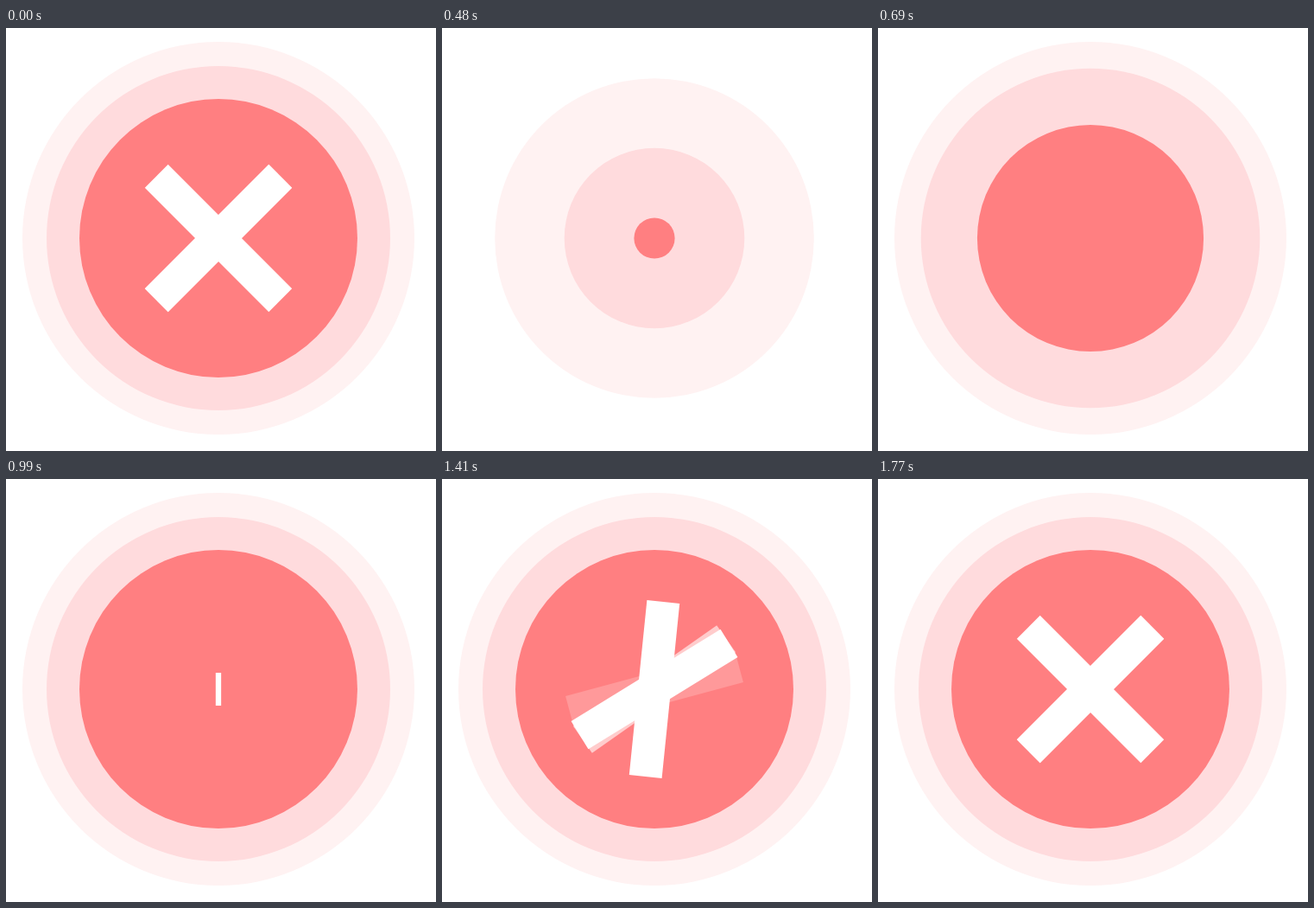
An HTML page for the animation above (2.25 s loop, 498x489 px).

```html
<!DOCTYPE html>
<html lang="en">
<head>
<meta charset="utf-8">
<title>Error badge</title>
<style>
  html, body { margin: 0; width: 100%; height: 100%; overflow: hidden; background: #fff; }
  svg { display: block; width: 498px; height: 489px; }
</style>
</head>
<body>
<svg viewBox="0 0 498 489">
  <g id="stage" transform="translate(246 243)"></g>
</svg>
<script>
const LOOP = 2250, STEP = 30, HOLD = 120;
const GROW = 537, SPIN = 452;
const BAR = { start: 958, time: 227, length: 203, width: 38 };

const discs = [
  { r: 227, fill: '#fff2f2', start: 115 },
  { r: 199, fill: '#ffdbdd', start: 205 },
  { r: 161, fill: '#ff7f81', start: 325 }
];

// Back to front: two faint trailing bars, then the two strokes of the cross.
const bars = [
  { turn: -225, start: 1318, alpha: 0.2 },
  { turn: -225, start: 1276, alpha: 0.6 },
  { turn: -135, start: 1250, alpha: 1 },
  { turn: -225, start: 1213, alpha: 1 }
];

const stage = document.getElementById('stage');

function add(tag, attrs) {
  const el = document.createElementNS('http://www.w3.org/2000/svg', tag);
  set(el, attrs);
  return stage.appendChild(el);
}

function set(el, attrs) {
  for (const key in attrs) el.setAttribute(key, attrs[key]);
}

// Same curve as cubic-bezier(.5, 0, .5, 1).
function ease(x) {
  if (x <= 0) return 0;
  if (x >= 1) return 1;
  let lo = 0, hi = 1;
  for (let i = 0; i < 30; i++) {
    const u = (lo + hi) / 2;
    if (1.5 * u * (1 - u) + u * u * u < x) lo = u;
    else hi = u;
  }
  return lo * lo * (3 - 2 * lo);
}

const progress = (t, start, time) => ease((t - start) / time);

for (const d of discs) d.el = add('circle', { fill: d.fill });
for (const b of bars) {
  b.el = add('rect', { fill: '#fff', 'fill-opacity': b.alpha, y: -BAR.width / 2, height: BAR.width });
}

function draw(time) {
  let t = Math.floor((time % LOOP) / STEP) * STEP;
  if (t < HOLD) t = LOOP;

  for (const d of discs) set(d.el, { r: d.r * progress(t, d.start, GROW) });

  const length = BAR.length * progress(t, BAR.start, BAR.time);
  for (const b of bars) {
    const angle = b.turn * progress(t, b.start, SPIN);
    set(b.el, { x: -length / 2, width: length, transform: `rotate(${angle})` });
  }
}

const begin = performance.now();
function tick() {
  draw(performance.now() - begin);
  requestAnimationFrame(tick);
}
tick();
</script>
</body>
</html>
```
